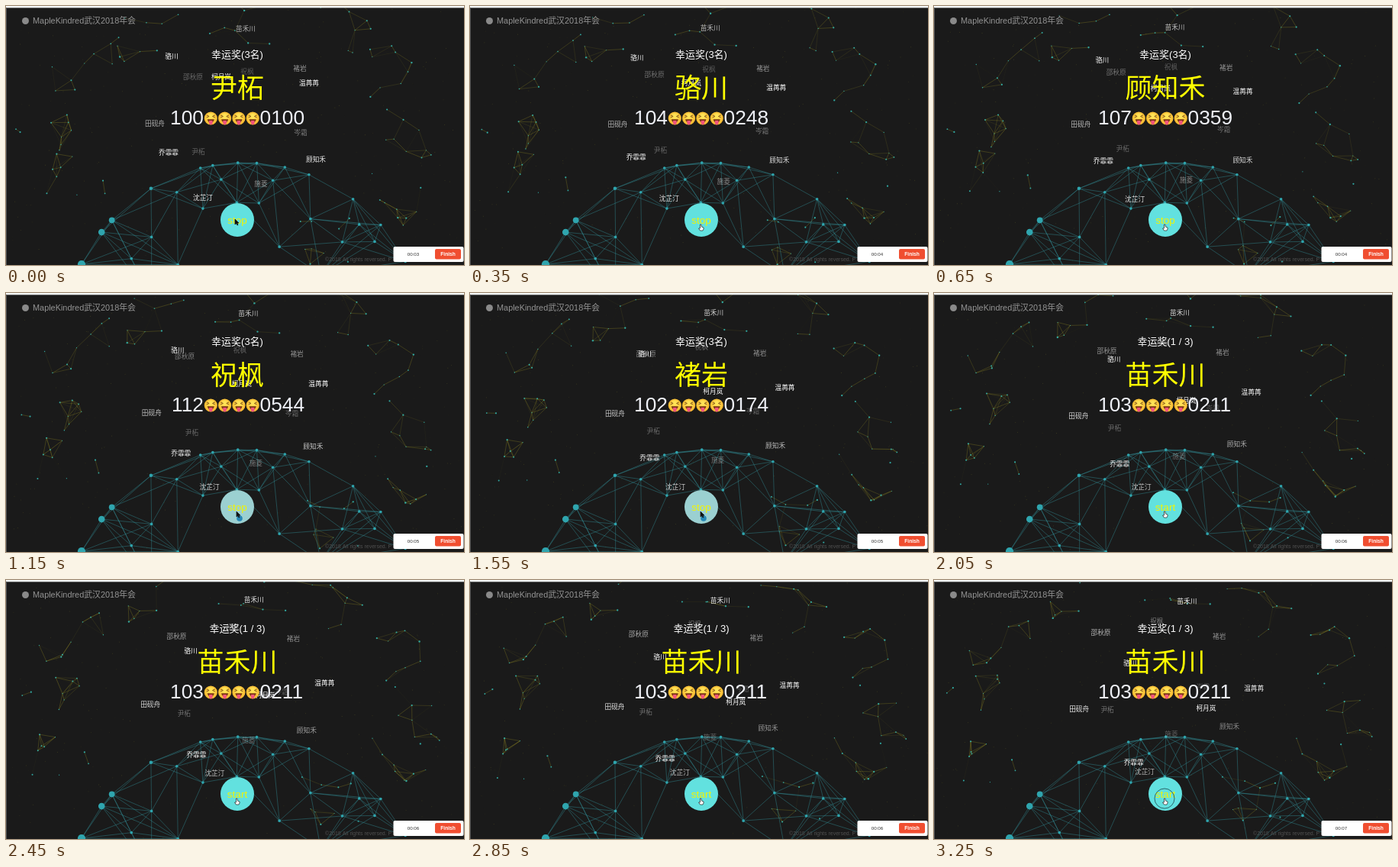
An HTML page with a canvas for the animation above (3.35 s loop, 600x339 px).

```html
<!DOCTYPE html>
<html lang="zh">
<head>
<meta charset="utf-8">
<style>
html, body { margin: 0; width: 100%; height: 100%; overflow: hidden; background: #1a1a1a; }
canvas { display: block; }
</style>
</head>
<body>
<canvas id="stage" width="600" height="339"></canvas>
<script>
const c = document.getElementById('stage').getContext('2d');
const LOOP = 3350, STOP = 1750, TAU = Math.PI * 2, RAD = TAU / 360;
const SANS = '"Liberation Sans", "Noto Sans CJK SC", "Noto Sans CJK", sans-serif';
const FRONT = 1, BACK = -1, WINNER = 3;

let seed = 41;
const rnd = () => (seed = seed * 16807 % 2147483647) / 2147483647;
const spread = n => (rnd() * 2 - 1) * n;
const times = (n, make) => Array.from({ length: n }, (_, i) => make(i));
const dist = (p, q) => Math.hypot(p[0] - q[0], p[1] - q[1]);

function disc(x, y, r, fill) {
  c.fillStyle = fill;
  c.beginPath();
  c.arc(x, y, r, 0, TAU);
  c.fill();
}

function path(points, stroke, width) {
  c.strokeStyle = stroke;
  c.lineWidth = width;
  c.beginPath();
  points.forEach(([x, y]) => c.lineTo(x, y));
  c.stroke();
}

function text(s, x, y, size, fill, align = 'center', weight = '') {
  c.font = `${weight} ${size}px ${SANS}`;
  c.textAlign = align;
  c.textBaseline = 'middle';
  c.fillStyle = fill;
  c.fillText(s, x, y);
}

function box(x, y, w, h, r, fill) {
  c.fillStyle = fill;
  c.beginPath();
  c.roundRect(x, y, w, h, r);
  c.fill();
}

// Names sit on a ball that turns about a diagonal axis, seen in perspective.
const BALL = { x: 303, y: 141, r: 108, eye: 290, speed: .2 };

// Finds the point of the ball seen at (x, y), on its near or far side.
function onBall(x, y, side) {
  const { r, eye } = BALL, dx = x - BALL.x, dy = y - BALL.y;
  const q = (dx * dx + dy * dy) / (eye * eye);
  const root = Math.sqrt(Math.max(0, (q * eye) ** 2 - (q + 1) * (q * eye * eye - r * r)));
  const z = (q * eye + side * root) / (q + 1), scale = 1 - z / eye;
  return { along: (dx + dy) * scale / 2, across: (dx - dy) * scale / 2, z };
}

const tags = [
  ['尹柘', 252, 192, BACK],
  ['温苒苒', 397, 102, FRONT],
  ['褚岩', 385, 83, BACK],
  ['苗禾川', 314, 31, BACK],
  ['骆川', 217, 67, FRONT],
  ['柯月岚', 282, 94, FRONT],
  ['邵秋原', 245, 94, BACK],
  ['顾知禾', 406, 202, FRONT],
  ['田砚舟', 195, 155, BACK],
  ['施菱', 334, 234, BACK],
  ['乔霏霏', 213, 193, FRONT],
  ['沈芷汀', 258, 252, BACK],
  ['祝枫', 316, 87, BACK],
  ['岑霜', 386, 167, BACK]
].map(([name, ...spot]) => ({ name, spot: onBall(...spot) }));

function drawTags(t) {
  const turn = BALL.speed * t / 1000, cos = Math.cos(turn), sin = Math.sin(turn);
  for (const { name, spot } of tags) {
    const along = spot.along * cos + spot.z * sin * Math.SQRT1_2;
    const z = spot.z * cos - spot.along * sin * Math.SQRT2;
    const scale = BALL.eye / (BALL.eye - z);
    const alpha = Math.min(1, Math.max(.05, (scale - .62) / .6));
    text(name, BALL.x + (along + spot.across) * scale, BALL.y + (along - spot.across) * scale,
      8.7, `rgba(255,255,255,${alpha})`);
  }
}

// The dome: rings round one centre, each a radius and angles from the top.
const nodes = Object.entries({
  237: [-64, -52, -47, -31, -14, -10, -2, 4, 13, 21, 37, 49, 63],
  217: [-24, -8, 10, 44, 52],
  185: [-53, -41, -17, -3, 6, 28, 44],
  135: [-64, -40, 20, 48]
}).reverse().flatMap(([r, angles]) =>
  angles.map(a => [312 + r * Math.sin(a * RAD), 442 - r * Math.cos(a * RAD)]));
const RIM = 13;
const edges = nodes.flatMap((p, i) => {
  const near = nodes.filter((q, j) => j !== i).sort((a, b) => dist(p, a) - dist(p, b)).slice(0, 6);
  return (i < RIM - 1 ? [nodes[i + 1], ...near] : near).map(q => [p, q]);
}).filter(([p, q], i, all) => all.findIndex(([a, b]) => a === p && b === q || a === q && b === p) === i);

function drawGlobe() {
  for (const e of edges) path(e, 'rgba(52,150,160,.6)', .7);
  nodes.forEach(([x, y], i) => disc(x, y, 1.8 + (i < RIM ? Math.max(0, 205 - x) / 32 : 0), '#2fa5ae'));
}

// Loose groups of drifting dots around the edge of the stage.
const groups = times(10, k => {
  const a = (63 - 30 * k) * RAD;
  return {
    phase: rnd() * TAU,
    dots: times(9, () => ({
      x: 300 + 245 * Math.cos(a) + spread(42), y: 160 + 150 * Math.sin(a) + spread(34),
      wobble: rnd() * TAU, r: .5 + rnd() * .7
    }))
  };
});
const specks = times(260, () => [rnd() * 600, 4 + rnd() * 330, rnd() * TAU]);

function drawParticles(t) {
  const s = t / 1000;
  for (const [x, y, p] of specks) {
    c.fillStyle = `rgba(170,165,50,${.18 + .12 * Math.sin(p + s * 2)})`;
    c.fillRect(x + 6 * Math.sin(s + p), y + 6 * Math.cos(s + p), .8, .8);
  }
  for (const { phase, dots } of groups) {
    const pts = dots.map(d => [
      d.x + 10 * Math.sin(s + phase) + 4 * Math.sin(s + d.wobble),
      d.y + 10 * Math.cos(s + phase) + 4 * Math.cos(s + d.wobble)
    ]);
    pts.forEach((p, i) => {
      for (const q of pts.slice(i + 1)) {
        const near = 1 - dist(p, q) / 34;
        if (near > 0) path([p, q], `rgba(190,180,40,${.4 * Math.min(1, near * 3)})`, .6);
      }
    });
    pts.forEach(([x, y], i) => disc(x, y, dots[i].r, 'rgba(50,190,185,.85)'));
  }
}

function drawFace(x, y) {
  const g = c.createRadialGradient(x, y - 3, 2, x, y, 9);
  g.addColorStop(0, '#ffe357');
  g.addColorStop(1, '#f7b52c');
  disc(x, y, 8.6, g);
  for (const k of [-1, 1])
    path([[x + 5.5 * k, y - 4.2], [x + 2.2 * k, y - 2.5], [x + 5.5 * k, y - 1.2]], '#7a4a14', .9);
  c.fillStyle = '#7a3514';
  c.beginPath();
  c.arc(x, y + 1.2, 4.4, 0, Math.PI);
  c.fill();
  box(x - 2.4, y + 3, 4.8, 5.4, [1, 1, 2.4, 2.4], '#f2557c');
}

function drawPrize(t) {
  const done = t >= STOP;
  const i = done ? WINNER : Math.floor((t + 50) / 100) % tags.length;
  text(done ? '幸运奖(1 / 3)' : '幸运奖(3名)', 303, 64, 13, '#fff');
  text(tags[i].name, 303, 110, 35, '#ff0');
  text(100 + i, 259, 147.7, 26.3, '#eef0f6', 'right');
  text(`0${100 + i * 37}`, 332.5, 147.7, 26.3, '#eef0f6', 'left');
  for (let k = 0; k < 4; k++) drawFace(268.3 + 18.3 * k, 147);
}

function pointer(x, y, outline, fill, edge) {
  c.beginPath();
  outline.forEach(([a, b]) => c.lineTo(x + a, y + b));
  c.closePath();
  c.fillStyle = fill;
  c.fill();
  c.strokeStyle = edge;
  c.lineWidth = .7;
  c.stroke();
}
const drawArrow = (x, y) =>
  pointer(x, y, [[0, 0], [0, 7], [1.7, 5.5], [3, 8], [4, 7.5], [2.9, 5], [5, 5]], '#111', '#111');
const drawHand = (x, y) =>
  pointer(x, y, [[-1.5, -4], [0, -4], [.3, -1], [3, 0], [3, 2], [2, 4], [-1.5, 4], [-3.5, 1], [-1.5, 1]], '#fff', '#222');

function drawButton(t) {
  const busy = t >= 1000 && t < STOP;
  disc(303, 280, 22, busy ? '#9bd0d1' : '#62e1df');
  text(t < STOP ? 'stop' : 'start', 303, 281, 13.5, '#f4f400');
  if (t > 3100) {
    c.strokeStyle = '#26595c';
    c.lineWidth = .9;
    c.beginPath();
    c.arc(302, 286, 13, 0, TAU);
    c.stroke();
  }
  if (busy) {
    disc(306, 295, 3.8, '#2687b5');
    drawArrow(302, 286);
  } else if (t < 300) drawArrow(300, 279);
  else drawHand(303, 290);
}

function drawRecorder(t) {
  box(507.5, 315, 92, 20, 2, '#fff');
  text(`00:0${3 + Math.floor((t + 950) / 1000)}`, 533.5, 325.3, 6.2, '#333');
  box(562, 318, 34, 13.5, 2, '#f04e30');
  text('Finish', 579, 325.2, 6.6, '#fff', 'center', 'bold');
}

function drawFrame(t) {
  c.fillStyle = '#1a1a1a';
  c.fillRect(0, 0, 600, 339);
  drawParticles(t);
  drawGlobe();
  drawTags(t);
  disc(25.5, 19.5, 4.5, '#8a8a8a');
  text('MapleKindred武汉2018年会', 35, 20, 10.9, '#949494', 'left');
  text('©2018 All rights reversed. P', 418, 332, 7, '#505050', 'left');
  drawPrize(t);
  drawButton(t);
  c.fillStyle = '#f2f6f5';
  c.fillRect(0, 0, 600, 2.4);
  c.fillStyle = '#555';
  c.fillRect(0, 2, 1, 337);
  drawRecorder(t);
}

const start = performance.now();
function tick() {
  drawFrame((performance.now() - start) % LOOP);
  requestAnimationFrame(tick);
}
tick();
</script>
</body>
</html>
```
